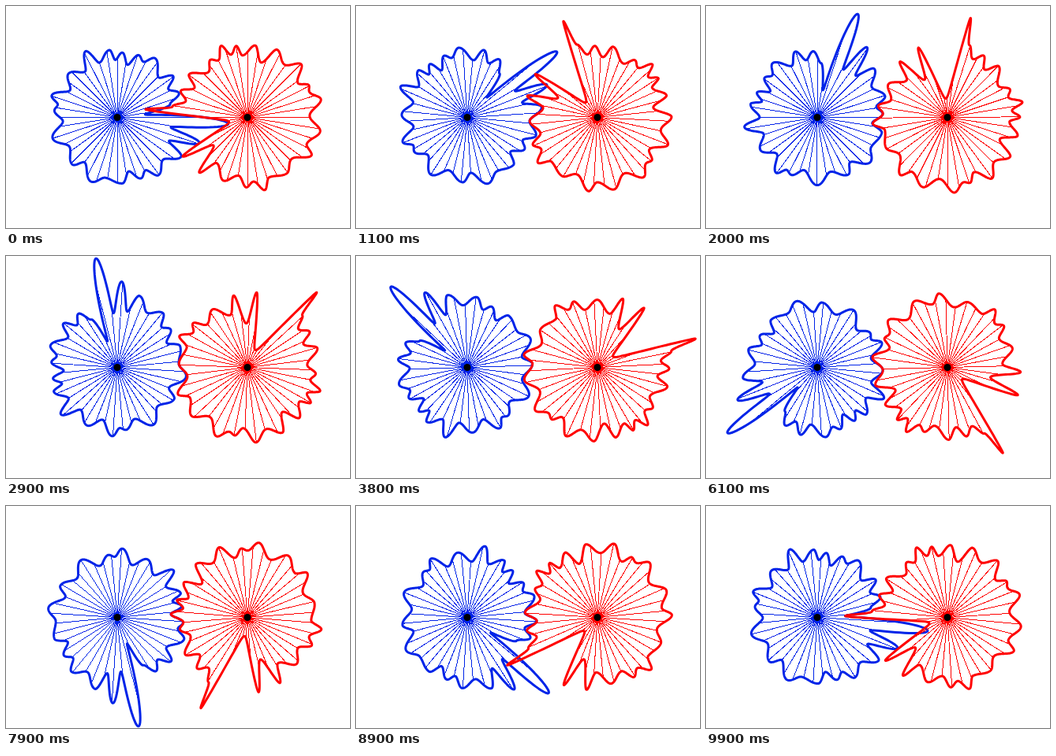
Write an HTML page that moves like this. It is 436 by 282 pixels and loops after 10000 ms.

```html
<!DOCTYPE html>
<html lang="en">
<head>
<meta charset="utf-8">
<title>Rolling non-circular gears</title>
<style>
html, body { margin: 0; width: 100%; height: 100%; overflow: hidden; background: #fff; }
svg { display: block; }
.rim { fill: none; stroke-width: 3; stroke-linejoin: round; }
.spokes { fill: none; stroke-width: 1; shape-rendering: crispEdges; }
</style>
</head>
<body>
<svg id="stage" width="436" height="282" viewBox="0 0 436 282"></svg>
<script>
const DISTANCE = 165, CENTER_Y = 141.5, SAMPLES = 1000, FRAMES = 100, FRAME_MS = 100;
const TAU = 2 * Math.PI, RAD = Math.PI / 180;

// Crests and hollows of the driving gear: angle in degrees, radius.
const EXTREMA = [
  [-3.4, 141], [6, 35.5], [14, 69], [21.5, 84], [29, 74], [36.5, 88], [44, 73], [57.5, 89],
  [65, 78], [71, 83.5], [79, 68], [85.5, 82.5], [92, 73], [96.5, 86], [108, 73], [115.5, 93],
  [125, 71], [138, 83], [150, 69], [161.5, 87.5], [168, 77], [173.5, 80], [184, 69], [198, 86],
  [211.5, 71], [226.5, 82.5], [234, 70.5], [248, 88], [259, 78], [274.5, 84], [282, 70],
  [291.3, 83], [298, 76], [305.5, 90], [317, 79], [328.5, 95], [335.5, 72], [342.7, 109],
  [349.5, 69], [356.6, 141]
];

function radiusAt(degrees, shift) {
  const a = degrees > 356.6 ? degrees - 360 : degrees;
  const i = Math.max(1, EXTREMA.findIndex(p => p[0] >= a));
  const [a0, r0] = EXTREMA[i - 1], [a1, r1] = EXTREMA[i];
  const adjust = r => r > 60 && r < 120 ? r + shift : r;
  const mix = (1 - Math.cos(Math.PI * (a - a0) / (a1 - a0))) / 2;
  return adjust(r0) * (1 - mix) + adjust(r1) * mix;
}

// Contact radii over one turn and the follower's accumulated angle.
function roll(shift) {
  const radii = [], turn = [0];
  for (let i = 0; i < SAMPLES; i++) {
    radii.push(radiusAt(360 - 360 * i / SAMPLES, shift));
  }
  for (let i = 0; i < SAMPLES; i++) {
    const r = (radii[i] + radii[(i + 1) % SAMPLES]) / 2;
    turn.push(turn[i] + TAU / SAMPLES * r / (DISTANCE - r));
  }
  return { radii, turn };
}

// Tune the radii so that both gears close after exactly one turn.
let low = -10, high = 10;
for (let i = 0; i < 30; i++) {
  const mid = (low + high) / 2;
  if (roll(mid).turn[SAMPLES] > TAU) high = mid; else low = mid;
}
const { radii, turn } = roll((low + high) / 2);

const polar = (r, a) => (r * Math.cos(a)).toFixed(2) + ' ' + (-r * Math.sin(a)).toFixed(2);
const outline = points => 'M' + points.join('L') + 'Z';
const driver = outline(radii.map((r, i) => polar(r, -TAU * i / SAMPLES)));
const follower = outline(radii.map((r, i) => polar(DISTANCE - r, Math.PI + turn[i])));
const spokes = Array.from({ length: 40 }, (_, i) => 'M0 0L' + polar(150, i * 9 * RAD)).join('');

const gear = (id, x, color, shape) => `
  <g transform="translate(${x} ${CENTER_Y})">
    <g id="${id}" stroke="${color}">
      <clipPath id="${id}-clip"><path d="${shape}"/></clipPath>
      <path class="spokes" d="${spokes}" clip-path="url(#${id}-clip)"/>
      <path class="rim" d="${shape}"/>
    </g>
    <circle r="4.5"/>
  </g>`;

const stage = document.getElementById('stage');
stage.innerHTML = '<rect width="436" height="282" fill="#fff"/>' +
  gear('driver', 141, '#0024e8', driver) + gear('follower', 306, '#f00', follower);
const driverGear = document.getElementById('driver');
const followerGear = document.getElementById('follower');

function draw(ms) {
  const step = Math.floor(ms / FRAME_MS) % FRAMES;
  driverGear.setAttribute('transform', `rotate(${-360 * step / FRAMES})`);
  followerGear.setAttribute('transform', `rotate(${turn[step * SAMPLES / FRAMES] / RAD})`);
}

const start = performance.now();
function tick() {
  draw(performance.now() - start);
  requestAnimationFrame(tick);
}
tick();
</script>
</body>
</html>
```
